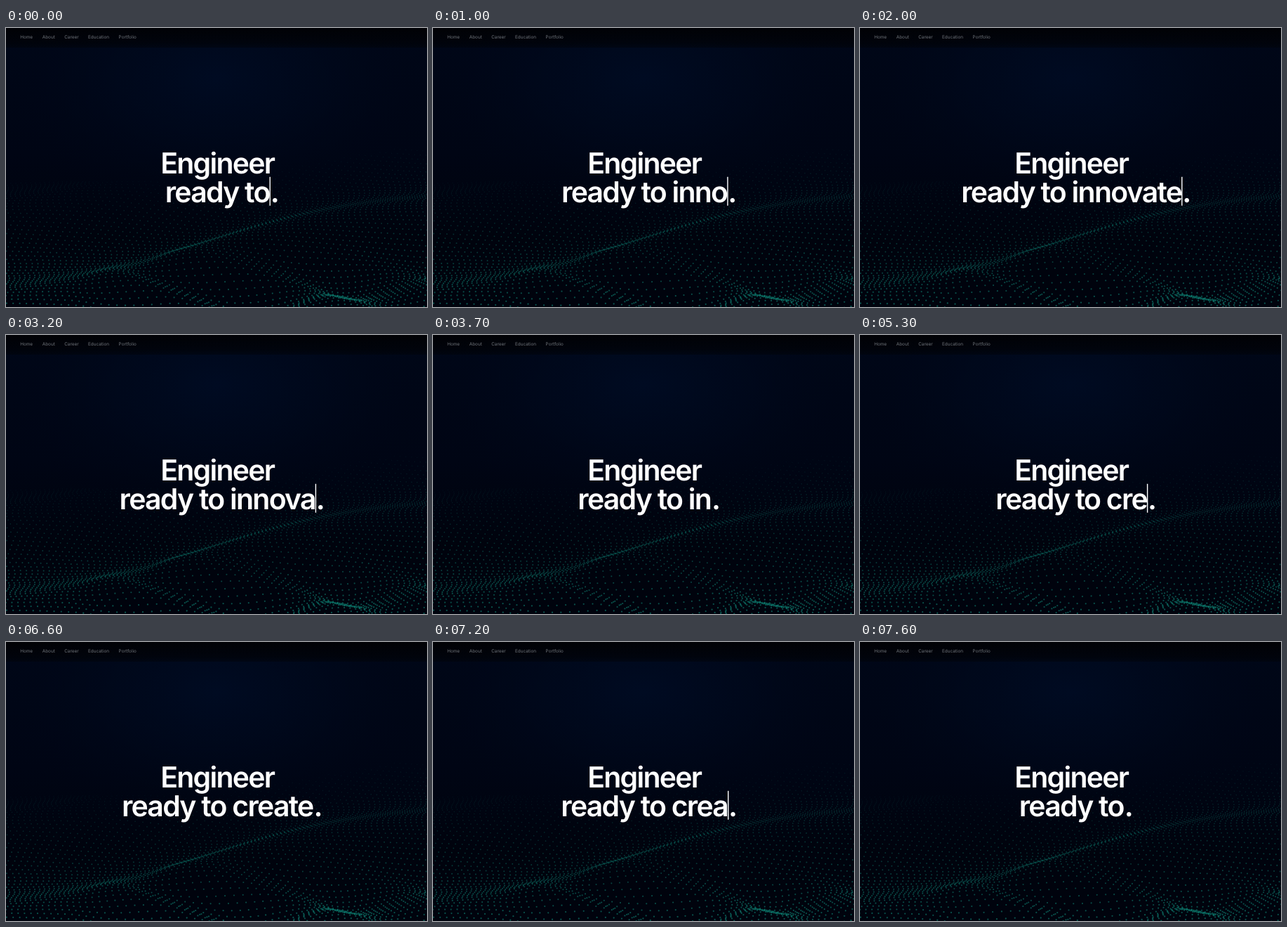
An HTML page with a canvas that plays this animation: 600x397 px, repeating every 8 s.

```html
<!DOCTYPE html>
<html lang="en">
<head>
<meta charset="utf-8">
<title>Engineer</title>
<style>
  html, body { margin: 0; width: 100%; height: 100%; overflow: hidden; background: #00030d; }
  canvas, svg { position: absolute; left: 0; top: 0; width: 600px; height: 397px; }
  text { font-family: Inter, sans-serif; text-rendering: geometricPrecision; }
  .nav { font-size: 6.4px; fill: #70747a; }
  .big { font-size: 41px; font-weight: 600; letter-spacing: -0.043em; fill: #fff; }
  .mid { text-anchor: middle; }
</style>
</head>
<body>
<canvas id="waves" width="600" height="397"></canvas>
<svg viewBox="0 0 600 397">
  <defs>
    <linearGradient id="bar" x1="0" y1="0" x2="0" y2="1">
      <stop offset="0" stop-color="#010103" stop-opacity=".9"/>
      <stop offset=".75" stop-color="#010206" stop-opacity=".7"/>
      <stop offset="1" stop-color="#010206" stop-opacity=".4"/>
    </linearGradient>
  </defs>
  <rect width="600" height="28" fill="url(#bar)"/>
  <g class="nav">
    <text x="20.2" y="15.3">Home</text>
    <text x="51.8" y="15.3">About</text>
    <text x="83.2" y="15.3">Career</text>
    <text x="117" y="15.3">Education</text>
    <text x="160.6" y="15.3">Portfolio</text>
  </g>
  <text class="big mid" x="301.2" y="207.1">Engineer</text>
  <text class="big mid" id="line" x="301.2" y="248">ready to</text>
  <text class="big" id="dot" y="248">.</text>
  <rect id="caret" y="211.8" width="1.4" height="41" fill="#fff"/>
</svg>
<script>
const LOOP = 8000;
const words = [
  { text: 'innovate',
    add: [300, 600, 800, 1000, 1200, 1600, 1800, 2000],
    del: [3000, 3200, 3300, 3400, 3500, 3700, 3800, 3900] },
  { text: 'create',
    add: [4800, 5000, 5300, 5600, 5800, 6100],
    del: [7000, 7200, 7300, 7400, 7500, 7600] }
];
const $ = id => document.getElementById(id);
const line = $('line'), dot = $('dot'), caret = $('caret');
const clamp = (v, a = 0, b = 1) => Math.min(b, Math.max(a, v));
const wave = (v, length) => Math.sin(2 * Math.PI * v / length);

function drawSky(c) {
  const sky = c.createLinearGradient(0, 0, 0, 397);
  sky.addColorStop(0, '#000718');
  sky.addColorStop(.45, '#000514');
  sky.addColorStop(.75, '#00030d');
  c.fillStyle = sky;
  c.fillRect(0, 0, 600, 397);
  c.save();
  c.translate(300, 70);
  c.scale(1.75, 1);
  const glow = c.createRadialGradient(0, 0, 0, 0, 0, 190);
  glow.addColorStop(0, '#000b22');
  glow.addColorStop(.45, 'rgba(0,9,29,.65)');
  glow.addColorStop(1, 'rgba(0,5,20,0)');
  c.fillStyle = glow;
  c.fillRect(-300, -100, 600, 450);
  c.restore();
}

// A grid of dots bent along one rising ridge, with a cross ripple near the viewer.
function drawWaves(c) {
  for (let col = -14; col < 92; col++) {
    for (let row = 0; row < 66; row++) {
      const x0 = 300 + (col * 8 - 300) * (.92 + .0025 * row);
      const y0 = 160 + 3.6 * row + .014 * row * row;
      const across = clamp(x0 / 600);
      const ridge = 302 - 72 * Math.tanh((x0 - 290) / 230);
      const swell = wave(y0 - ridge, 130);
      const near = clamp((y0 - 310) / 50) * clamp((x0 - 120) / 100);
      const ripple = near * wave(y0 - .41 * x0 - 274, 87);
      const x = x0 - (36 - 16 * across) * swell + 5 * ripple;
      const y = y0 - (9 + 6 * across) * swell - 9 * ripple;
      const top = 218 - 48 * clamp((x - 300) / 260);
      const depth = clamp((y - top) / (397 - top));
      if (!depth) continue;
      c.fillStyle = `rgba(14,118,106,${.08 + .62 * Math.pow(depth, .8)})`;
      c.beginPath();
      c.arc(x, y, .75 + .4 * depth, 0, 7);
      c.fill();
    }
  }
}

function typed(t) {
  const passed = times => times.filter(at => at <= t).length;
  for (const { text, add, del } of words) {
    const n = passed(add) - passed(del);
    if (n) return ' ' + text.slice(0, n);
  }
  return '';
}

function render(t) {
  const text = 'ready to' + typed(t);
  if (line.textContent !== text) line.textContent = text;
  const end = 301.2 + line.getComputedTextLength() / 2;
  dot.setAttribute('x', end + 1);
  caret.setAttribute('x', end - .1);
  const offAt = t >= 2000 && t < 3000 ? 500 : 600;
  caret.setAttribute('visibility', t % 1000 < offAt ? 'visible' : 'hidden');
}

const ctx = $('waves').getContext('2d');
drawSky(ctx);
drawWaves(ctx);
const start = performance.now();
function tick() {
  render((performance.now() - start) % LOOP);
  requestAnimationFrame(tick);
}
tick();
</script>
</body>
</html>
```
